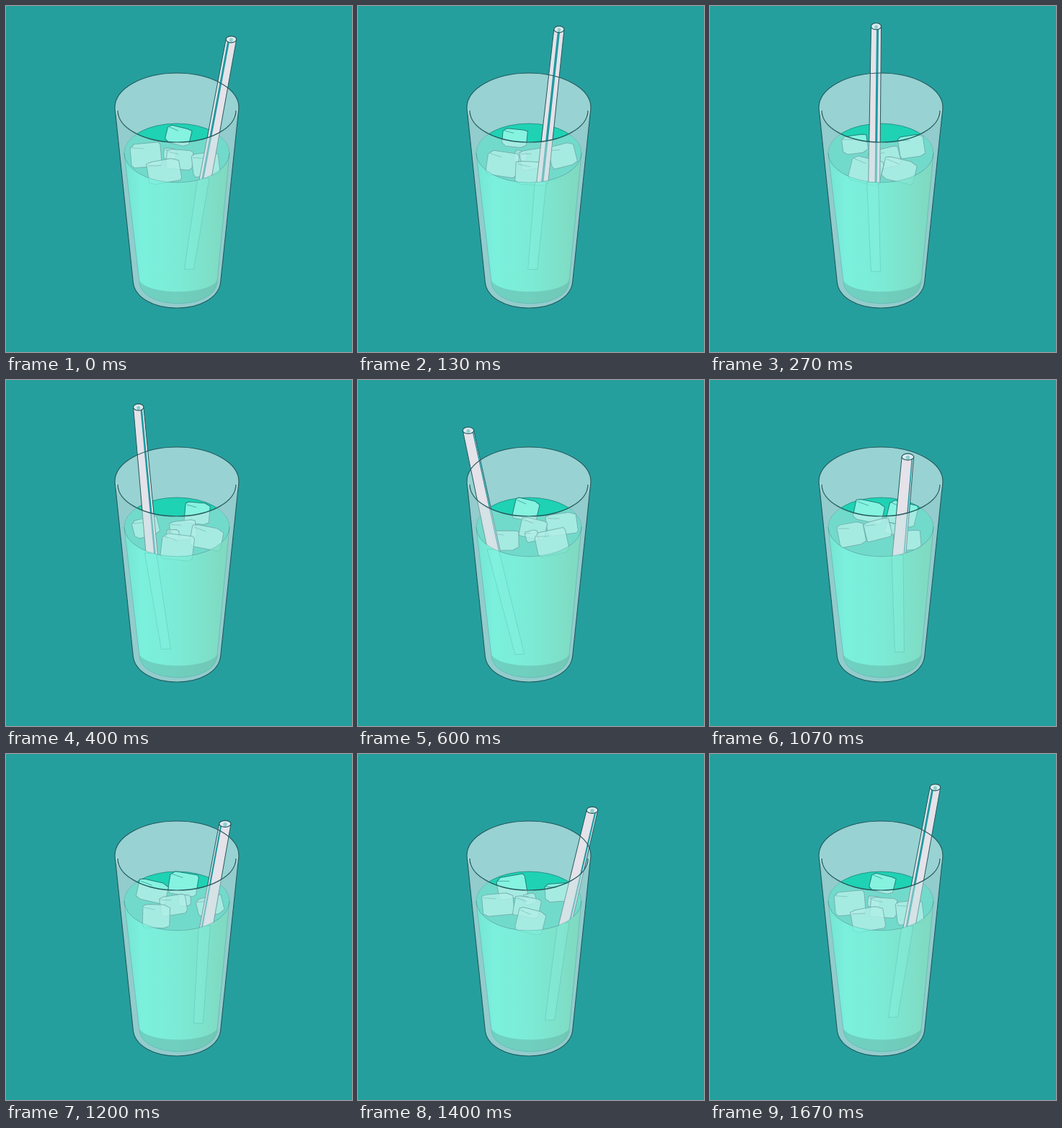
Write an HTML page with a canvas that moves like this. It is 480x480 px and loops after 1740 ms.

```html
<!DOCTYPE html>
<html lang="en">
<head>
<meta charset="utf-8">
<title>Iced drink</title>
<style>
  html, body { margin: 0; width: 100%; height: 100%; overflow: hidden; background: #259f9e; }
  canvas { display: block; width: 100vw; height: 100vh; }
</style>
</head>
<body>
<canvas id="stage" width="480" height="480"></canvas>
<script>
const ctx = document.getElementById('stage').getContext('2d');
const LOOP = 1740, STEP = 200 / 3, STEPS = 25;
const INK = '#23595c';
const rad = degrees => degrees * Math.PI / 180;
const sin = degrees => Math.sin(rad(degrees));
const cos = degrees => Math.cos(rad(degrees));

function seeded(seed) {
  return () => {
    const s = Math.sin(seed++ * 127.1) * 43758.5453;
    return s - Math.floor(s);
  };
}

const ellipse = (x, y, rx, ry) => {
  const p = new Path2D();
  p.ellipse(x, y, rx, ry, 0, 0, 2 * Math.PI);
  return p;
};
const polygon = points => {
  const p = new Path2D();
  points.forEach(([x, y]) => p.lineTo(x, y));
  p.closePath();
  return p;
};
const line = (x0, y0, x1, y1) => {
  const p = new Path2D();
  p.moveTo(x0, y0);
  p.lineTo(x1, y1);
  return p;
};

const glass = new Path2D('M151 141 L176 380 C178 432 296 432 298 380 L323 141 A86 48 0 0 0 151 141Z');
const rim = ellipse(237, 141, 86, 48);
const frontRim = new Path2D('M155 145 A82 44 0 0 0 319 145');
const frontWall = new Path2D(
  'M151 141 L155 145 A82 44 0 0 0 319 145 L323 141 L298 380 C296 432 178 432 176 380Z');
const pool = { x: 237, y: 204, rx: 73, ry: 41 };
const surface = ellipse(pool.x, pool.y, pool.rx, pool.ry);
const liquid = new Path2D('M164 204 A73 41 0 0 0 310 204 L293 382 C291 423 187 423 185 382Z');
const base = new Path2D('M184 379 C192 402 285 402 294 379 L293 382 C291 423 187 423 185 382Z');

const tint = ctx.createLinearGradient(165, 0, 310, 0);
tint.addColorStop(0, '#75e5d2');
tint.addColorStop(0.16, '#7bf0dc');
tint.addColorStop(0.5, '#7cebd6');
tint.addColorStop(1, '#80d8bf');

function fill(path, color) {
  ctx.fillStyle = color;
  ctx.fill(path);
}
function stroke(path, color, width = 1) {
  ctx.strokeStyle = color;
  ctx.lineWidth = width;
  ctx.stroke(path);
}
function clipped(path, draw) {
  ctx.save();
  ctx.clip(path);
  draw();
  ctx.restore();
}

// A block of ice: a box with unevenly cut corners, in units of its half size.
function makeCube(phase, orbit, width, height) {
  const random = seeded(phase);
  const corners = [[-1, -1], [1, -1], [1, 1], [-1, 1]];
  const shape = corners.flatMap(([x, y], i) => {
    const cutX = [x * (0.55 + 0.35 * random()), y];
    const cutY = [x, y * (0.6 + 0.35 * random())];
    return i % 2 ? [cutX, cutY] : [cutY, cutX];
  });
  return { phase, orbit, width, height, shape, twist: 360 * random() };
}
const cubes = [
  makeCube(90, 1, 36, 26),
  makeCube(182, 1, 42, 33),
  makeCube(244, 1, 43, 30),
  makeCube(328, 1, 36, 31),
  makeCube(285, 0.15, 36, 27),
  makeCube(150, 0.3, 17, 15)
];

function placeCube(cube, turn) {
  const angle = cube.phase + turn;
  const near = 1 - 0.06 * cube.orbit * sin(angle);
  return {
    shape: cube.shape,
    x: 239 + 45 * cube.orbit * cos(angle),
    y: 210 - 4 * cube.orbit - 26 * cube.orbit * sin(angle),
    w: cube.width / 2 * near,
    h: cube.height / 2 * near,
    tilt: 14 * sin(2 * turn + cube.twist)
  };
}

function drawCube({ shape, x, y, w, h, tilt }) {
  ctx.save();
  ctx.translate(x, y);
  ctx.rotate(rad(tilt));
  ctx.lineJoin = 'round';
  const outline = polygon(shape.map(([px, py]) => [px * w, py * h]));
  fill(outline, 'rgba(155,250,235,.82)');
  stroke(outline, 'rgba(25,105,105,.8)', 1);
  stroke(line(-0.9 * w, -0.72 * h, -0.1 * w, -0.55 * h), 'rgba(25,105,105,.6)', 0.8);
  ctx.restore();
}

// The straw stirs around the glass, hurrying through the back of its circle.
function poseStraw(turn) {
  const lag = turn - 21.6;
  const angle = 34 + turn + 14.5 * (1 - cos(lag)) + 2 * sin(2 * lag);
  const entryX = 238 + 49 * cos(angle) - 5 * sin(angle);
  return {
    topX: 240 + 87 * cos(angle),
    topY: 69 - 41 * sin(angle),
    entryX,
    entryY: pool.y + pool.ry * Math.sqrt(1 - ((entryX - pool.x) / pool.rx) ** 2),
    footX: 244 + 20 * cos(angle) - 12 * sin(angle),
    footY: 374 - 9 * sin(angle + 45),
    spin: -30 + 1.5 * turn - 52 * (1 - cos(turn + 14.4))
  };
}

function drawStraw({ topX: x0, topY: y0, entryX: x1, entryY, spin }) {
  const y1 = entryY + 4;
  const w0 = 14 + (y0 - 28) / 30, w1 = w0 + 2;
  const tube = polygon([[x0 - w0 / 2, y0], [x0 + w0 / 2, y0], [x1 + w1 / 2, y1], [x1 - w1 / 2, y1]]);
  fill(tube, '#e5e2e9');
  for (const face of [spin, spin + 180]) {
    if (cos(face) < 0.05) continue;
    const side = sin(face) * 0.42;
    stroke(line(x0 + side * w0, y0, x1 + side * w1, y1), '#1d9ba2', Math.max(1.5, 3.3 * cos(face)));
  }
  stroke(tube, INK, 1);
  const mouth = ellipse(x0, y0, w0 / 2, 4.5);
  fill(mouth, '#dcecee');
  fill(ellipse(x0, y0 + 1, w0 / 6, 2.8), '#8fcdd0');
  stroke(mouth, INK, 1.2);
}

function drawSunkenStraw({ entryX, entryY, footX, footY }) {
  const tube = polygon([[entryX - 10, entryY], [entryX + 6, entryY],
    [footX + 6.5, footY], [footX - 6.5, footY]]);
  fill(tube, 'rgba(135,242,226,.3)');
  stroke(tube, 'rgba(65,160,150,.35)', 0.8);
}

function draw(step) {
  const turn = step * 360 / STEPS;
  const straw = poseStraw(turn);
  const ice = cubes.map(cube => placeCube(cube, turn)).sort((a, b) => a.y - b.y);

  ctx.fillStyle = '#259f9e';
  ctx.fillRect(0, 0, 480, 480);
  fill(glass, '#5eb6b7');
  fill(rim, '#98d2d2');
  clipped(glass, () => {
    fill(surface, '#1fd2b4');
    stroke(surface, 'rgba(30,110,110,.7)', 0.9);
  });
  ice.forEach(drawCube);
  drawStraw(straw);

  fill(frontWall, 'rgba(198,228,228,.5)');
  fill(liquid, tint);
  clipped(liquid, () => {
    fill(base, 'rgba(100,180,168,.5)');
    ctx.globalAlpha = 0.15;
    ice.forEach(drawCube);
    ctx.globalAlpha = 1;
    drawSunkenStraw(straw);
  });
  stroke(liquid, 'rgba(60,150,145,.45)', 0.8);
  stroke(frontRim, INK, 1.2);
  stroke(glass, INK, 1.1);
}

function frame(now) {
  draw(Math.floor((now % LOOP + 3.4) / STEP) % STEPS);
  requestAnimationFrame(frame);
}
draw(0);
requestAnimationFrame(frame);
</script>
</body>
</html>
```
